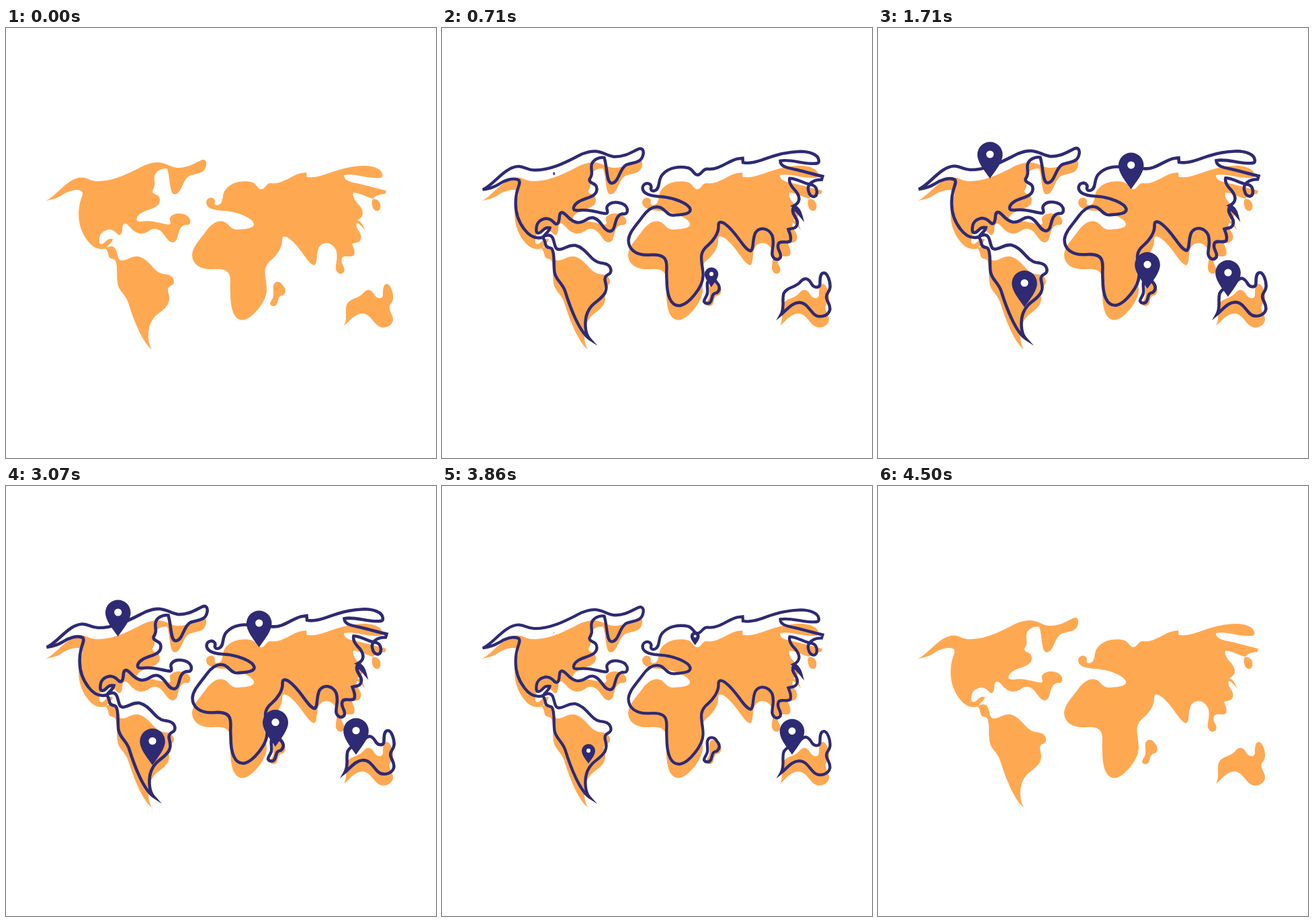
Recreate the animation shown at these times as an HTML page. Size 640 px wide and 640 px high, loop 4.87 s.

```html
<!DOCTYPE html>
<html lang="en">
<head>
<meta charset="utf-8">
<title>World map with pins</title>
<style>
  html, body { margin: 0; width: 100%; height: 100%; overflow: hidden; background: #fff; }
  svg { display: block; width: 100%; height: 100%; }
</style>
</head>
<body>
<svg id="stage" viewBox="0 0 640 640">
  <g id="land" fill="#ffa852"></g>
  <g id="coast" fill="none" stroke="#2f2a74" stroke-miterlimit="10"></g>
  <g id="pins"></g>
</svg>
<script>
const LOOP = 4870;
const NAVY = '#2f2a74';
const LINE_WIDTH = 4.6;

const arctic = `M59 257C74 252 92 222 113 222.5C122 223 124 227.5 136 228C165 228 190 212 207 204
  C232 194 238 205 254 208C270 209 281 201 291 196.5C296 194.5 299 198 298 204
  C296 218 283 216 273 220C262 226 262 247 251 247.5C243 247 245 226 240 209.5
  C232 208 222 213 221 221C220 230 224 232 218 242C217 249 229 246 229 256
  C229 272 202 268 195 282C193 288 196 288 202 288`;
const gulf = `C218 285 235 293 243 292.5C248 291 241 285 245 281C251 273 270 275 274 285
  C275 290 274 294 267 293C253 296 259 319 248 319C238 318 236 302 224 299
  C214 297 213 306 200 306C187 304 184 292 177 291C171 292 175 302 171 307
  C166 312 165 300 153 300C143 302 138 307 139 319C140 323 144 322 147 319
  C151 315 153 313 159 314C158 320 152 322 149 328C138 331 129 327 121 316
  C111 303 106 286 109 266C111 252 116 248 113 243C105 238 90 244 83 249
  C75 254 66 256 59 257Z`;
const southAmerica = `M148 328C155 323 162 324 164 331C167 339 166 347 174 346
  C182 345 186 339 197 340C214 344 220 364 234 366C243 367 249 369 250 377
  C250 386 241 381 241 391C242 399 245 401 241 411C233 424 222 424 215 440
  C210 452 211 471 218 479C204 470 190 435 182 409C178 396 168 392 166 380
  C164 368 167 352 162 345C158 342 156 345 153 340C152 335 151 330 148 328Z`;
const siberia = `M447 215L447.5 221.5C470 226 490 206 533 205C547 205 559 210 560 217
  C562 224 556 223 549 223C533 223 519 216 503 219C503 226 510 229 524 231.5
  C540 235 552 239 566 242L564.5 247C551 247 542 254 545 264C546 270 550 273 554 272
  C559 270 559 258 551 255C540 254 528 245 517 245C515 251 520 258 526 264
  C533 273 533 281 523 286C528 288 532 293 534 301C530 296 526 291 522 290`;
const asiaCoast = `C519 300 531 304 528 314C526 320 522 319 515 321C517 328 520 330 518 338
  C514 343 502 336 500 343C497 352 506 355 503 363C499 368 493 366 491 359
  C490 350 495 342 491 330C485 318 472 317 466 326C461 336 464 350 459 353
  C449 352 439 326 421 313C415 309 411 309 411 315`;
const africaEurope = `C412 327 402 339 395 345C379 358 388 370 388 390C388 407 367 432 354 434.5
  C340 436 334 420 334 395C333 382 335 375 333 369C331 359 319 358 308 359
  C287 360 277 350 277 337C278 325 288 316 298 302C306 291 315 286 323 288
  C332 290 333 300 344 300C355 299 370 299 369 291C367 283 345 273 322 272
  C308 271 298 268 298 259C299 251 310 250 311 258C309 263 313 265 317 263
  C325 259 320 247 328 239C338 228 354 227 366 229.5C374 232 374 240 380 240
  C387 239 387 230 395 231C412 233 425 219 439 216Z`;
const island = `M398 383C400 376 408 376 412 383C417 388 417 394 412 398C404 399 406 405 403 411
  C401 415 395 415 393 411C393 407 397 404 398 399C399 393 397 388 398 383Z`;
const australia = `M503 443C509 432 504 422 507 412C512 401 525 404 533 393C540 386 545 391 549 398
  C552 403 560 404 561 398C561 390 561 381 567 381C572 381 577 394 576 403
  C575 411 569 411 571 419C573 426 576 427 576 435C574 446 558 450 550 440
  C543 432 539 425 530 425C518 426 513 435 503 443Z`;

// x shift, then y shift at the start and end of the lift
const lands = [
  { d: arctic + gulf, dx: 1.5, from: 1.5, to: -17 },
  { d: southAmerica, dx: 1.5, from: 1.5, to: -17 },
  { d: siberia + asiaCoast + africaEurope, dx: 0.5, from: -3, to: -21.8 },
  { d: island, dx: -3, from: 14, to: -4.5 },
  { d: australia, dx: 1.5, from: 1.5, to: -17 }
];

// Tip position, then the moments the pin starts to pop in and out
const pins = [
  { x: 401, y: 388, show: 632, hide: 3000 },
  { x: 166.7, y: 224, show: 700, hide: 3066 },
  { x: 376.7, y: 240, show: 800, hide: 3132 },
  { x: 218, y: 415.5, show: 930, hide: 3172 },
  { x: 521, y: 400, show: 1120, hide: 3340 }
];
const POP_IN = 560, POP_OUT = 800, PIVOT = -5;

const clamp = v => Math.min(1, Math.max(0, v));
const span = (t, start, length) => clamp((t - start) / length);
const inOutCubic = p => p < 0.5 ? 4 * p ** 3 : 1 - 4 * (1 - p) ** 3;
const inBack = p => p * p * (2.70158 * p - 1.70158);
const outBack = p => 1 - inBack(1 - p);

function add(parent, tag, attrs) {
  const node = document.createElementNS('http://www.w3.org/2000/svg', tag);
  for (const name in attrs) node.setAttribute(name, attrs[name]);
  return parent.appendChild(node);
}

const [land, coast, pinLayer] = ['land', 'coast', 'pins'].map(id => document.getElementById(id));

for (const l of lands) {
  add(land, 'path', { d: l.d });
  l.node = add(coast, 'path', { d: l.d });
}
for (const p of pins) {
  p.node = add(pinLayer, 'g', {});
  add(p.node, 'path', {
    d: 'M0 0C-5 -8 -18.8 -23 -18.8 -35.6A18.8 18.8 0 0 1 18.8 -35.6C18.8 -23 5 -8 0 0Z',
    fill: NAVY
  });
  add(p.node, 'circle', { cy: -36, r: 5.6, fill: '#fff' });
}

function draw(t) {
  const lift = inOutCubic(span(t, 0, 880)) - inOutCubic(span(t, 3640, 880));
  coast.setAttribute('stroke-width', LINE_WIDTH * lift);
  coast.setAttribute('visibility', lift > 0.003 ? 'visible' : 'hidden');
  for (const l of lands) {
    l.node.setAttribute('transform', `translate(${l.dx} ${l.from + (l.to - l.from) * lift})`);
  }
  for (const p of pins) {
    const scale = outBack(span(t, p.show, POP_IN)) - inBack(span(t, p.hide, POP_OUT));
    p.node.setAttribute('visibility', scale > 0.001 ? 'visible' : 'hidden');
    p.node.setAttribute('transform',
      `translate(${p.x} ${p.y + PIVOT}) scale(${scale}) translate(0 ${-PIVOT})`);
  }
}

const begin = performance.now();
function tick() {
  draw((performance.now() - begin) % LOOP);
  requestAnimationFrame(tick);
}
tick();
</script>
</body>
</html>
```
